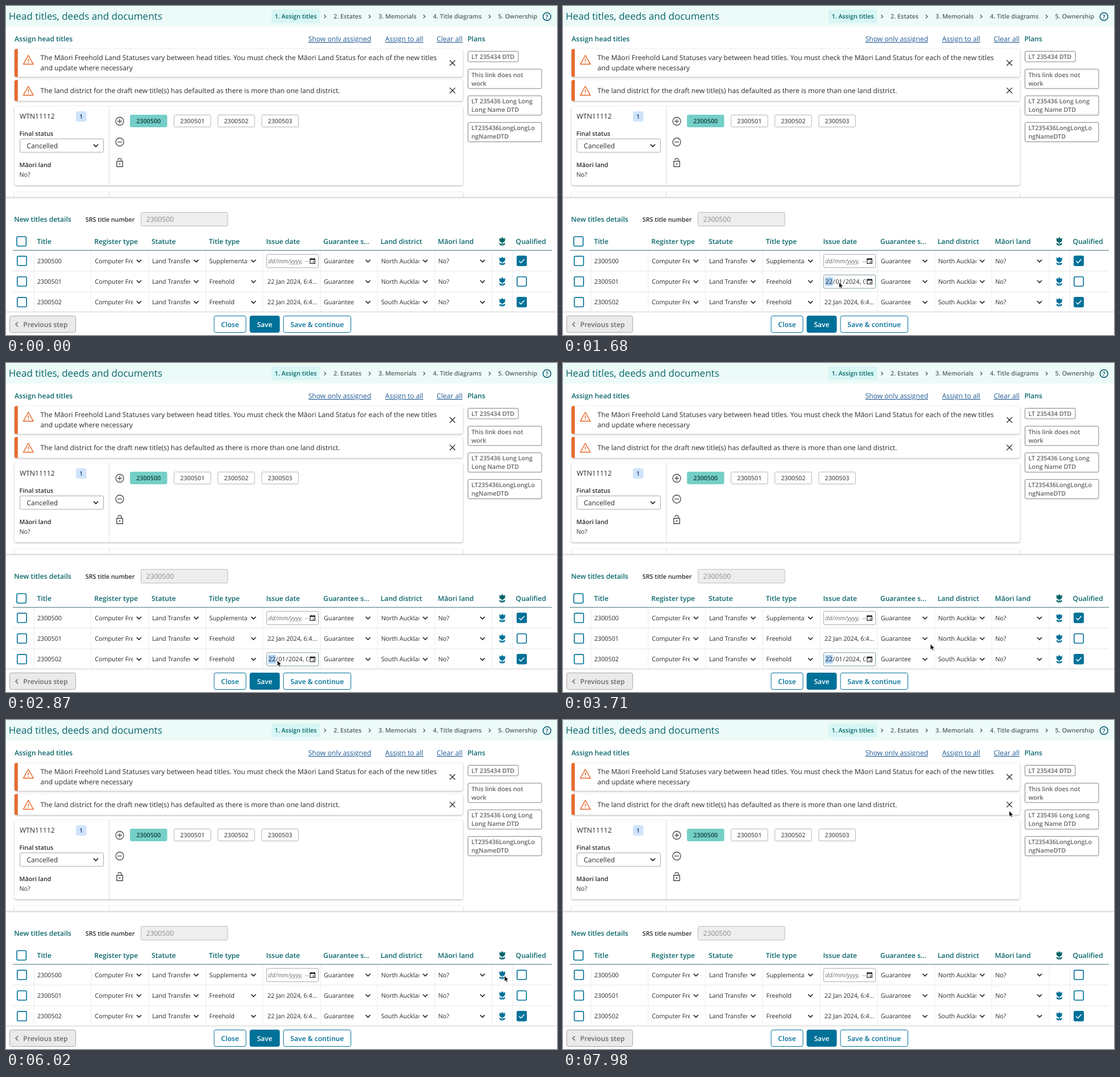
Write an HTML page that moves like this. It is 969 px wide and 578 px high and loops after 8000 ms.

```html
<!DOCTYPE html>
<html lang="en">
<head>
<meta charset="utf-8">
<title>Head titles</title>
<style>
html, body { margin: 0; width: 100%; height: 100%; overflow: hidden; background: #fff; }
svg { display: block; }
text { font-family: "Open Sans", "Noto Sans", sans-serif; white-space: pre; text-rendering: geometricPrecision; }
.card { filter: drop-shadow(0 1px 1.6px rgba(0, 0, 0, .32)); }
</style>
</head>
<body>
<svg id="stage" width="969" height="578" viewBox="0 0 969 578"></svg>
<script>
const INK = '#2a292c', TEAL = '#08666a', SEA = '#007198', GREY = '#6b6966', LINK = '#1f5a93', ORANGE = '#e86a2c';
const BODY = 12.11, SMALL = 10.77;
const out = [];
const add = s => out.push(s);

// y is the middle of the capital letters
function text(x, y, str, o = {}) {
  const { size = SMALL, color = INK, bold = false, more = '' } = o;
  add(`<text x="${x}" y="${y + size * .357}" font-size="${size}" font-weight="${bold ? 600 : 400}" fill="${color}" ${more}>${str}</text>`);
}
const rect = (x, y, w, h, fill, stroke = 'none', r = 2, more = '') =>
  add(`<rect x="${x}" y="${y}" width="${w}" height="${h}" rx="${r}" fill="${fill}" stroke="${stroke}" ${more}/>`);
const line = (d, color = INK, w = 1.4, more = '') =>
  add(`<path d="${d}" fill="none" stroke="${color}" stroke-width="${w}" ${more}/>`);
const down = (x, y) => line(`M${x - 4} ${y - 2}l4 4l4-4`, INK, 1.7);
const group = (id, draw) => { add(`<g id="${id}">`); draw(); add('</g>'); };
function clipped(x, y, w, str, o) {
  add(`<svg x="${x}" y="${y - 10}" width="${w}" height="20">`);
  text(0, 10, str, o);
  add('</svg>');
}
const mid = 'text-anchor="middle"';

function header() {
  rect(0, 0, 969, 36, '#ecfaf8', 'none', 0);
  text(4.8, 18.2, 'Head titles, deeds and documents', { size: 17.05, color: TEAL });
  rect(467, 6, 85, 24, '#d8f6f4', 'none', 3);
  [['1. Assign titles', 472.5], ['2. Estates', 576], ['3. Memorials', 655], ['4. Title diagrams', 751], ['5. Ownership', 865.5]]
    .forEach(([s, x], i) => text(x, 18.5, s, { bold: true, color: i ? '#5a605f' : TEAL }));
  [561, 639.5, 735.5, 850.5].forEach(x => line(`M${x - 1.5} 15.5l3 3l-3 3`, '#4c5251', 1.2));
  add(`<circle cx="951.3" cy="18.7" r="6.9" fill="none" stroke="#00556b" stroke-width="1.5"/>`);
  text(951.3, 18.7, '?', { bold: true, color: '#00556b', more: mid });
}

function alertBox(y, h, lines) {
  const c = y + h / 2;
  rect(15, y, 788.5, h, '#fff', 'none', 3, 'class="card"');
  add(`<path d="M20.8 ${y}h-2.8a3 3 0 0 0-3 3v${h - 6}a3 3 0 0 0 3 3h2.8z" fill="${ORANGE}"/>`);
  const top = lines.length > 1 ? 86.5 : 141;
  line(`M39.3 ${top}l8.8 15.8h-17.6z`, ORANGE, 1.5, 'stroke-linejoin="round"');
  line(`M39.3 ${top + 6}v4.6m0 1.3v1.7`, ORANGE, 1.6);
  lines.forEach((s, i) => text(60.6, c + (i - (lines.length - 1) / 2) * 18.2 - .1, s, { size: BODY }));
  line(`M780.3 ${c - 4.8}l9.6 9.6m0-9.6l-9.6 9.6`, INK, 1.3);
}

function assign() {
  text(15, 58, 'Assign head titles', { size: BODY, bold: true, color: TEAL });
  [['Show only assigned', 531.7], ['Assign to all', 666.8], ['Clear all', 757.6]]
    .forEach(([s, x]) => text(x, 58, s, { size: BODY, color: LINK, more: 'text-decoration="underline"' }));
  text(811.4, 58, 'Plans', { size: BODY, bold: true, color: TEAL });
  alertBox(75.5, 49, ['The Māori Freehold Land Statuses vary between head titles. You must check the Māori Land Status for each of the new titles', 'and update where necessary']);
  alertBox(130, 36.8, ['The land district for the draft new title(s) has defaulted as there is more than one land district.']);

  rect(15, 176, 788.5, 139, '#fff', 'none', 3, 'class="card"');
  line('M181.5 176v139', '#dedede', 1);
  add('<svg x="0" y="320" width="969" height="15">');
  rect(15, 7, 788.5, 40, '#fff', 'none', 3, 'class="card"');
  line('M181.5 7v20', '#dedede', 1);
  add('</svg>');
  rect(0, 335, 969, 3, '#e4e4e4', 'none', 0);

  text(24, 194, 'WTN11112', { size: BODY });
  rect(123, 185, 18.5, 18, '#cfe4fb', 'none', 3);
  text(132.2, 194, '1', { bold: true, color: '#1c4175', more: mid });
  text(23.6, 224.3, 'Final status', { bold: true });
  rect(24.5, 233.5, 147, 23.5, '#fff', '#a9a9a9');
  text(36.4, 245.5, 'Cancelled', { size: BODY });
  down(158, 245.2);
  text(23.6, 279, 'Māori land', { bold: true });
  text(23.4, 296, 'No?');

  [202.5, 239].forEach((y, i) => {
    add(`<circle cx="200" cy="${y}" r="7" fill="none" stroke="#4a494c" stroke-width="1.3"/>`);
    line(`M196 ${y}h8${i ? '' : 'm-4-4v8'}`, '#4a494c', 1.3);
  });
  line('M194.8 272.8h10.4v9.4h-10.4zM203 272.8v-2.2a3 3 0 0 0-6 0', '#4a494c', 1.4, 'stroke-linejoin="round"');
  add('<circle cx="200" cy="277.5" r="1.3" fill="#4a494c"/>');

  for (let i = 0; i < 4; i++) {
    const x = 218.5 + i * 77.1;
    rect(x, 191.5, 64.5, 21, i ? '#fff' : '#74cfc7', i ? '#b5b5b5' : '#74cfc7');
    text(x + 32.2, 202, '230050' + i, { bold: true, color: i ? '#605f62' : '#14403e', more: mid });
  }

  [[79.5, 88.5, ['LT 235434 DTD']], [111, 129.5, ['This link does not', 'work']],
   [157.8, 129.5, ['LT 235436 Long Long', 'Long Name DTD']], [204.6, 129.5, ['LT235436LongLongLo', 'ngNameDTD']]].forEach(([y, w, lines]) => {
    rect(812.5, y, w, lines.length > 1 ? 34 : 18.5, '#fff', '#828184');
    lines.forEach((s, i) => text(818.5, y + 9.8 + i * 15, s, { bold: true, color: '#636265' }));
  });
}

const box = (x, y, fill = '#fff') => rect(x - 8.2, y - 8.2, 16.4, 16.4, fill, SEA, 2, 'stroke-width="1.6"');
const tick = (x, y) => line(`M${x - 4.6} ${y + .2}l3.2 3.2l6-6.4`, '#fff', 1.5);

function tulip(x, y, color, open) {
  const paint = open ? `fill="#fff" stroke="${color}" stroke-width="1.2"` : `fill="${color}"`;
  add(`<g transform="translate(${x} ${y})" ${paint} stroke-linejoin="round">
    <path d="M-5-6.3L-2.6-4.6L0-7.4L2.6-4.6L5-6.3V-2.4C5 .6 3 2 0 2S-5 .6-5-2.4Z"/>
    <path d="M-.7 1.5h1.4v5.5h-1.4zM0 7.3C-.4 4.6-2.4 3.2-5.2 3.1C-5.2 5.8-3 7.4 0 7.4C3 7.4 5.2 5.8 5.2 3.1C2.4 3.2 .4 4.6 0 7.3Z"/></g>`);
}

function dateField(y, live) {
  rect(458.5, y - 11.5, 91, 23.5, '#fff', live ? '#7f9aa6' : '#a9a9a9');
  if (!live) clipped(461, y, 71.6, 'dd/mm/yyyy, --', { color: '#707070', more: 'font-style="italic" word-spacing="1.5"' });
  line(`M534.8 ${y - 3.7}h8.6v8.2h-8.6zM536.8 ${y - 5}v2m4.6-2v2`, INK, 1.2);
  rect(534.5, y - 3.8, 9.2, 2.2, INK, 'none', 0);
  rect(539.6, y + 1, 2, 2, INK, 'none', 0);
}

function editor(row, y) {
  group('edit' + row, () => {
    dateField(y, true);
    group('mark' + row, () => rect(461, y - 7.5, 13.5, 15, '#a9d0f5', 'none', 0));
    [['22', 461.6], ['/', 474.6], ['01', 479.2], ['/', 492.2], ['2024,', 496.8]].forEach(([s, x]) => text(x, y, s));
    clipped(527.6, y, 4.2, '0');
  });
}

const cols = [...Array(8)].map((_, i) => 54.6 + i * 100.7);
const rowY = [447.8, 484, 520.3];

function table() {
  text(14.2, 374.5, 'New titles details', { size: BODY, bold: true, color: TEAL });
  text(139.8, 375, 'SRS title number', { bold: true });
  rect(237.5, 362.5, 152.5, 24, '#eeeeee', '#bdbdbd');
  text(246.6, 375, '2300500', { size: BODY, color: '#8b8b8b' });

  box(27.2, 413.5);
  ['Title', 'Register type', 'Statute', 'Title type', 'Issue date', 'Guarantee s...', 'Land district', 'Māori land']
    .forEach((s, i) => text(cols[i], 414, s, { size: BODY, bold: true, color: TEAL }));
  tulip(872.7, 413.5, TEAL);
  text(896.6, 414, 'Qualified', { size: BODY, bold: true, color: TEAL });
  line('M12 429.2H960', '#3d6f78', 1.1);
  line('M12 465.7H960M12 502H960', '#e4e6e6', 1);
  [...cols.map(x => x - 5.4), 855, 891.3].forEach(x => line(`M${x} 430V537`, '#e9ebeb', 1));

  rowY.forEach((y, i) => {
    box(28, y);
    text(cols[0] + .3, y, '230050' + i);
    clipped(cols[1] + .9, y, 67, 'Computer Freehold');
    clipped(cols[2] + .9, y, 67, 'Land Transfer Act');
    clipped(cols[3] + .9, y, 67, i ? 'Freehold' : 'Supplementary');
    text(cols[5] + .9, y, 'Guarantee');
    clipped(cols[6] + .9, y, 67, (i < 2 ? 'North' : 'South') + ' Auckland');
    text(cols[7] + .7, y, 'No?');
    [233.8, 334.5, 435.2, 636.6, 737.3, 838].forEach(x => down(x, y));
    if (i) {
      group('date' + i, () => text(459.8, y, '22 Jan 2024, 6:4...'));
      editor(i, y);
      tulip(872.7, y, SEA);
    } else {
      dateField(y, false);
      group('solid', () => tulip(872.7, y, SEA));
      group('open', () => tulip(872.7, y, SEA, true));
    }
    box(907, y);
    if (i !== 1) {
      group('fill' + i, () => box(907, y, SEA));
      group('tick' + i, () => tick(907, y));
    }
  });
}

function footer() {
  rect(0, 537, 969, 41, '#fff', 'none', 0);
  line('M0 537.5H969', '#cfcfcf', 1);
  rect(6.5, 544.5, 116, 29, '#eaeaea', '#a8a8a8', 3);
  line('M21 555.5l-4 3.8l4 3.8', GREY, 1.5);
  text(30.3, 559.3, 'Previous step', { size: BODY, bold: true, color: GREY });
  [['Close', 366, 56], ['Save', 429, 52], ['Save &amp; continue', 488, 118.5]].forEach(([s, x, w], i) => {
    rect(x, 544.5, w, 29, i === 1 ? SEA : '#fff', SEA, 3);
    text(x + w / 2, 559.3, s, { size: BODY, bold: true, color: i === 1 ? '#fff' : SEA, more: mid });
  });
}

header();
assign();
table();
footer();
group('pointer', () => add('<path d="M0 0V10.6L2.4 8.4L4.1 12L5.9 11.2L4.3 7.7H7.5Z" fill="#000" stroke="#fff" stroke-width=".9" stroke-linejoin="round"/>'));
const stage = document.getElementById('stage');
stage.innerHTML = out.join('');

const LOOP = 8000, STEP = 70;
// start, end, from x, from y, to x, to y
const moves = [
  [70, 630, 560, 579, 485.4, 485],
  [2030, 2310, 485.4, 485, 477, 522],
  [3500, 3990, 477, 522, 906.6, 449.5],
  [4970, 5110, 906.6, 449.5, 876.5, 449],
  [7000, 7280, 876.5, 449, 784.6, 159.3]
];
// visible from, until
const shown = {
  edit1: [770, 2310], mark1: [910, 2310],
  edit2: [2310, 4480], mark2: [2380, 4480],
  tick0: [0, 4550], fill0: [0, 4690],
  solid: [0, 6300], open: [6300, 7140],
  pointer: [70, LOOP]
};
const el = id => document.getElementById(id);
const show = (id, on) => { el(id).style.visibility = on ? 'visible' : 'hidden'; };
const marked = { mark1: 1, mark2: 1 };
const ease = p => p * p * (3 - 2 * p);

function place(t) {
  const m = moves.filter(v => t >= v[0]).pop() || moves[0];
  const p = ease(Math.max(0, Math.min(1, (t - m[0]) / (m[1] - m[0]))));
  return [m[2] + (m[4] - m[2]) * p, m[3] + (m[5] - m[3]) * p];
}

function render(now) {
  const t = Math.floor((now % LOOP) / STEP) * STEP;
  for (const id in shown) show(id, t >= shown[id][0] && t < shown[id][1]);
  show('date1', t < 770 || t >= 2310);
  show('date2', t < 2310 || t >= 4480);
  el('pointer').setAttribute('transform', `translate(${place(t)})`);
}

const start = performance.now();
function tickFrame() {
  render(performance.now() - start);
  requestAnimationFrame(tickFrame);
}
tickFrame();
</script>
</body>
</html>
```
